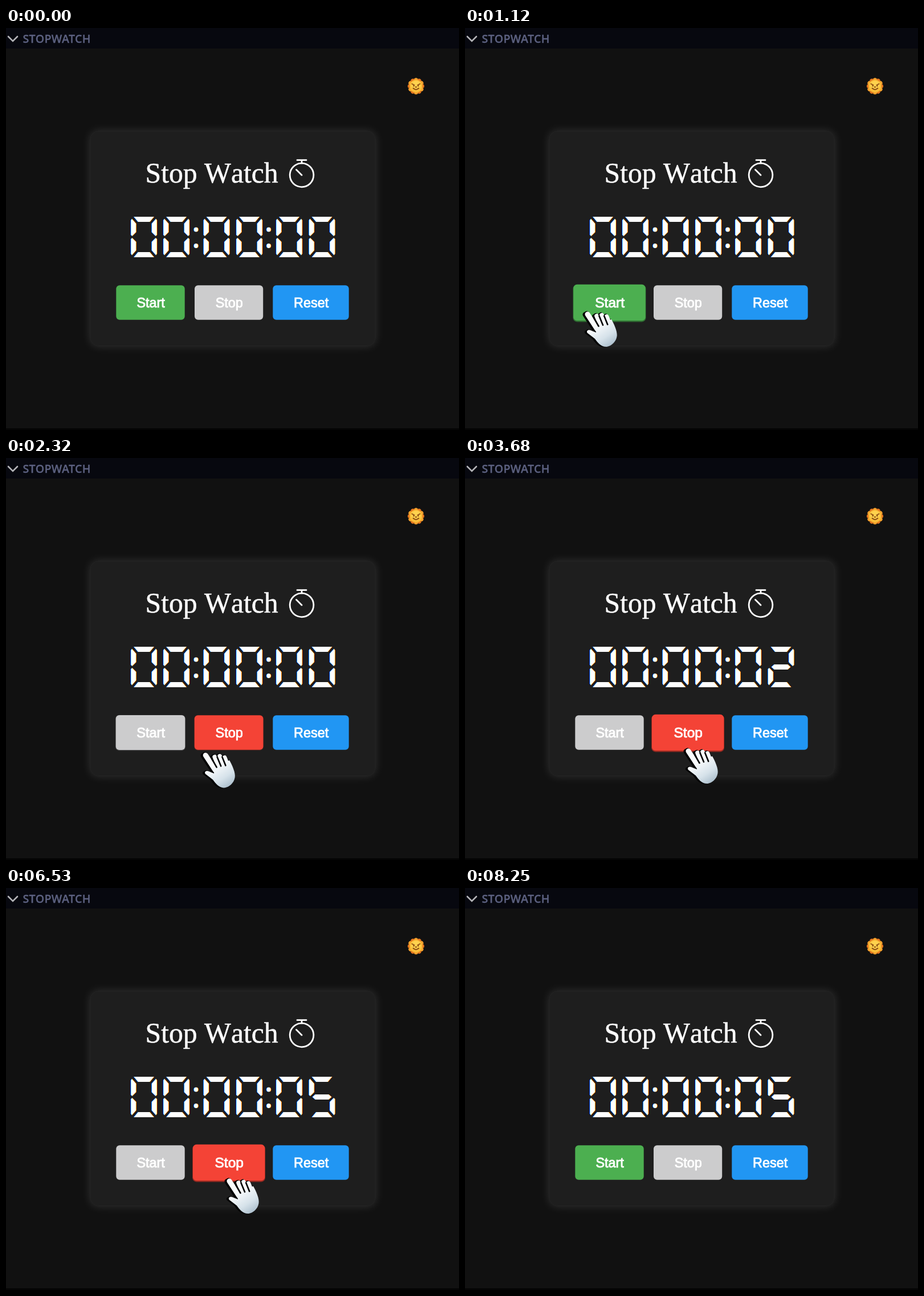
An HTML page that plays this animation: 795x705 px, repeating every 8370 ms.

```html
<!DOCTYPE html>
<html lang="en">
<head>
<meta charset="utf-8">
<title>Stop Watch</title>
<style>
  html, body { margin: 0; width: 100%; height: 100%; overflow: hidden; background: #111; }
  svg { display: block; width: 795px; height: 705px; }
  .bar { font: 600 19.6px "Open Sans", "Noto Sans", sans-serif; letter-spacing: .35px; fill: #5c6180; stroke: #5c6180; stroke-width: .3; }
  .title { font: 49.7px "Liberation Serif", "Times New Roman", serif; font-kerning: none; fill: #fff; stroke: #fff; stroke-width: .5; }
  .card { fill: #1e1e1e; stroke: #242424; filter: drop-shadow(0 0 8px rgba(255, 255, 255, .13)); }
  .btn text { font: 23.4px "Liberation Sans", Arial, sans-serif; fill: #fff; stroke: #fff; stroke-width: .9; text-anchor: middle; }
  .btn .edge { filter: brightness(.62); }
  .time { isolation: isolate; }
  .time g { mix-blend-mode: screen; }
  .line { fill: none; stroke: #fff; stroke-linecap: round; }
</style>
</head>
<body>
<svg viewBox="0 0 795 705">
  <defs>
    <linearGradient id="skin" gradientUnits="userSpaceOnUse" x1="18" y1="10" x2="54" y2="64">
      <stop offset=".3" stop-color="#fafcfd"/>
      <stop offset=".7" stop-color="#d6e2ea"/>
      <stop offset="1" stop-color="#a9bdcb"/>
    </linearGradient>
  </defs>
  <rect width="795" height="705" fill="#111"/>
  <rect width="795" height="36" fill="#07080f"/>
  <rect y="702" width="795" height="3" fill="#050505"/>
  <path class="line" d="M4 15l8 8 8-8" style="stroke:#b4b4b8;stroke-width:2.6"/>
  <text class="bar" x="29.5" y="25.5">STOPWATCH</text>
  <g id="sun" transform="translate(719.5 102)"></g>
  <rect class="card" x="148" y="181" width="500" height="376.5" rx="14"/>
  <text class="title" x="244.5" y="271">Stop Watch</text>
  <g class="line" stroke-width="2.8">
    <circle cx="519" cy="258" r="20.8"/>
    <path d="M511 231.7h16M519 232v5M519 258l-9.5-9.5"/>
  </g>
  <g class="time" id="time"></g>
  <g id="buttons"></g>
  <g id="cursor"></g>
</svg>
<script>
const LOOP = 8370, START = 1400, STOP = 6700;
const $ = id => document.getElementById(id);
const clamp = v => Math.max(0, Math.min(1, v));
const smooth = v => (v = clamp(v), v * v * (3 - 2 * v));
const mix = (a, b, k) => a + (b - a) * k;
const rgb = (a, b, k) => `rgb(${a.map((v, i) => Math.round(mix(v, b[i], k)))})`;

// Fades in over each [from, to] span and out after it
const level = (t, spans, ms) =>
  spans.reduce((sum, [a, b]) => sum + smooth((t - a) / ms) - smooth((t - b) / ms), 0);

// Sun
function drawSun() {
  let rays = '';
  for (let i = 0; i < 12; i++) {
    rays += `<circle cx="0" cy="-11" r="3.6" fill="${i % 2 ? '#e2761f' : '#f3a02c'}" transform="rotate(${i * 30})"/>`;
  }
  $('sun').innerHTML = rays + `<circle r="11.3" fill="#fbbd38"/><circle cy="-1" r="8.5" fill="#ffd24e"/>
    <g fill="none" stroke="#8a4a12" stroke-width="1.9" stroke-linecap="round">
      <path d="M-7-4l4 2M7-4l-4 2M-5 3.5q5 5 10 0"/><path d="M-4.5-.5h1M3.5-.5h1M-1 1.5h2"/></g>`;
}

// Seven segments in a 46 by 71 box; the right side mirrors the left
const down = pts => pts.map(([x, y]) => [x, 71 - y]);
const flip = pts => pts.map(([x, y]) => [46 - x, y]);
const cap = [[5, 0], [41, 0], [33.5, 9], [12.5, 9]];
const side = [[0, 6], [2, 3.5], [9.5, 12], [9.5, 27], [2.5, 34], [0, 32]];
const segments = {
  a: cap, b: flip(side), c: flip(down(side)), d: down(cap), e: down(side), f: side,
  g: [[6, 35.5], [11, 31], [35, 31], [40, 35.5], [35, 40], [11, 40]]
};
const shapes = ['abcdef', 'bc', 'abged', 'abgcd', 'fgbc', 'afgcd'];
const slots = [219, 276, 346.5, 404, 474, 531.5];
const digit = (n, x) => [...shapes[n]].map(s =>
  'M' + segments[s].map(([px, py]) => `${px + x} ${py + 331}`).join('L') + 'Z').join('');
const dot = (x, y) => `M${x - 4} ${y}a4 4 0 1 0 8 0a4 4 0 1 0-8 0Z`;

// Slight colour fringes, as on subpixel text
const fringes = [['#f00', .5], ['#0f0', 0], ['#00f', -.6]];
let shown = -1;
function drawTime(sec) {
  if (sec === shown) return;
  shown = sec;
  const d = slots.map((x, i) => digit(i === 5 ? sec : 0, x)).join('') +
    [333.5, 461].map(x => dot(x, 353.5) + dot(x, 382)).join('');
  $('time').innerHTML = fringes.map(([c, dx]) =>
    `<g transform="translate(${dx})"><path d="${d}" fill="${c}"/></g>`).join('');
}

// Buttons
const grey = [204, 204, 205];
const buttons = [
  { label: 'Start', x: 193.3, w: 120.4, on: [76, 175, 80], hover: [[755, 2175], [7495, 7615]] },
  { label: 'Stop', x: 331, w: 120.2, on: [244, 67, 54], hover: [[2285, 7480]] },
  { label: 'Reset', x: 468.3, w: 133.4, on: [33, 150, 243], hover: [] }
];
function makeButton(b) {
  const box = `x="${-b.w / 2}" y="-30.2" width="${b.w}" height="60.4" rx="6"`;
  b.el = document.createElementNS('http://www.w3.org/2000/svg', 'g');
  b.el.setAttribute('class', 'btn');
  b.el.innerHTML = `<rect class="edge" ${box} stroke-width="1.6"/><rect class="face" ${box}/>
    <text x=".6" y="8.5">${b.label}</text>`;
  [b.edge, b.face] = b.el.querySelectorAll('rect');
  $('buttons').append(b.el);
}
function drawButton(b, t, enabled) {
  const h = level(t, b.hover, 200), fill = rgb(grey, b.on, enabled);
  b.el.setAttribute('transform', `translate(${b.x + b.w / 2} 481.5) scale(${1 + .05 * h})`);
  b.face.setAttribute('fill', fill);
  b.edge.setAttribute('fill', fill);
  b.edge.setAttribute('stroke', fill);
  b.edge.setAttribute('opacity', Math.sqrt(h));
  b.edge.setAttribute('transform', `translate(0 ${1.3 * Math.sqrt(h)})`);
}

// Pointer
const hand = fill => `<g fill="none" stroke="${fill}" stroke-linecap="round">
  <path d="M10 9L27 35" stroke-width="9"/>
  <path d="M26 12l7 17M35 10.5l6 16M43.5 13l6 15" stroke-width="7.6"/></g>
  <path fill="${fill}" d="M23 28L52 18C57 27 63 40 61.5 48C60 58 51 65 44 66C34 67 28 59 23 52L10 42C7 39 11 35 15 37L25 41Z"/>`;
const ban = `<circle r="17.6" fill="#fff" opacity=".85"/><circle r="14.4" fill="#fff"/>
  <g fill="none" stroke="#cf0a12" stroke-width="4.8"><circle r="14.4"/><path d="M-10-10L10 10"/></g>`;
function makeCursor() {
  $('cursor').innerHTML = `<g><g transform="translate(-4 .5)">${hand('#000')}</g>
    <g transform="translate(-1.5 -1)">${hand('#000')}</g>${hand('url(#skin)')}
    <path d="M21.5 16l8 14M30.4 12l6.6 16M39.2 12l6 15" fill="none" stroke="#000"
      stroke-width="2.6" stroke-linecap="round"/></g><g>${ban}</g>`;
}
// from, to, x0, y0, x1, y1, sag
const moves = [
  [250, 850, 130, 760, 205, 493, 0],
  [1955, 2490, 205, 493, 382, 505, 15],
  [7350, 7950, 382, 505, -80, 500, 0]
];
const blocked = [[START, 2175], [STOP, 7480]];
function drawCursor(t) {
  const m = moves.filter(r => t >= r[0]).pop() || moves[0];
  const s = smooth((t - m[0]) / (m[1] - m[0]));
  const x = mix(m[2], m[4], s), y = mix(m[3], m[5], s) + m[6] * Math.sin(Math.PI * s);
  const no = blocked.some(([a, b]) => t >= a && t < b);
  const [point, ring] = $('cursor').children;
  $('cursor').setAttribute('transform', `translate(${x} ${y})`);
  point.style.display = no ? 'none' : '';
  ring.style.display = no ? '' : 'none';
}

function draw(t) {
  const run = level(t, [[START, STOP]], 250);
  drawTime(Math.max(0, Math.floor((Math.min(t, STOP) - START) / 1000)));
  [1 - run, run, 1].forEach((on, i) => drawButton(buttons[i], t, on));
  drawCursor(t);
}

drawSun();
buttons.forEach(makeButton);
makeCursor();
const begin = performance.now();
function tick() {
  draw((performance.now() - begin) % LOOP);
  requestAnimationFrame(tick);
}
tick();
</script>
</body>
</html>
```
